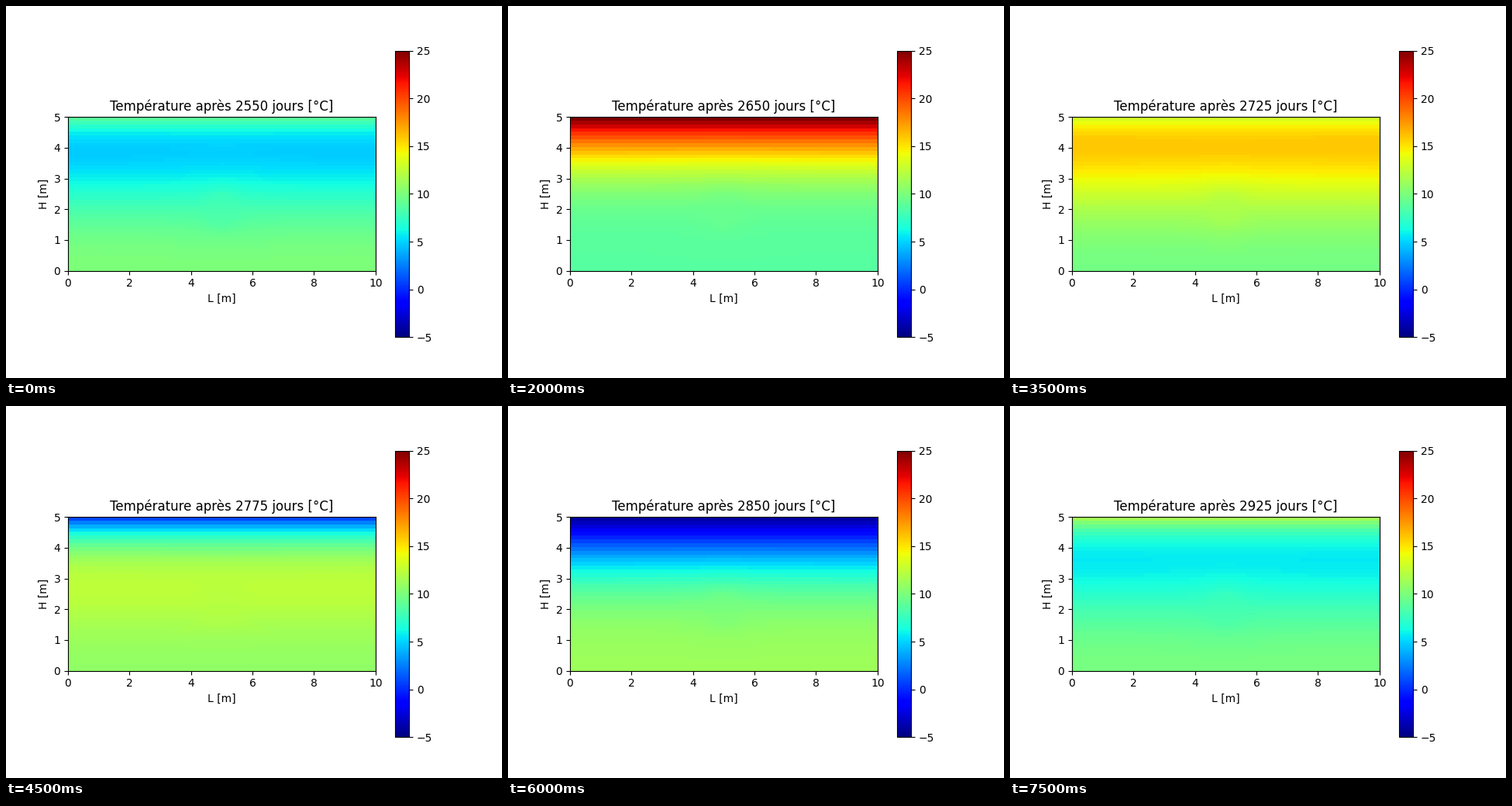
A matplotlib script that plays this animation: 640 px wide and 480 px high, repeating every 8000 ms.

```python
import numpy as np
import matplotlib.pyplot as plt
from matplotlib.animation import FuncAnimation

LENGTH, HEIGHT = 10, 5
MEAN, SWING = 10, 15          # yearly surface temperature, °C
OMEGA = 2 * np.pi / 365       # rad per day
DAMPING = 1.6                 # penetration depth, m
START, STEP, FRAMES = 2550, 25, 16
PIPE_X, PIPE_Y, PIPE_R, CONTRAST = 5, 2, 0.5, 0.55

x, y = np.meshgrid(np.linspace(0, LENGTH, 81), np.linspace(0, HEIGHT, 41))
k = (1 + 1j) / DAMPING

# Periodic heat wave in a slab with an insulated floor
wave = np.cosh(k * y) / np.cosh(k * HEIGHT)

# A conductive disc evens out the gradient inside it and disturbs it outside
slope = k * np.sinh(k * PIPE_Y) / np.cosh(k * HEIGHT)
dist2 = (x - PIPE_X) ** 2 + (y - PIPE_Y) ** 2
fade = np.sin(np.pi * y / HEIGHT)
wave = wave - (CONTRAST * slope * (y - PIPE_Y) * fade
               * PIPE_R ** 2 / np.maximum(dist2, PIPE_R ** 2))


def temperature(day):
    return MEAN + SWING * (wave * np.exp(1j * OMEGA * day)).imag


fig, ax = plt.subplots(figsize=(6.4, 4.8), dpi=100)
image = ax.imshow(temperature(START), cmap="jet", vmin=-5, vmax=25,
                  origin="lower", extent=(0, LENGTH, 0, HEIGHT),
                  interpolation="nearest")
fig.colorbar(image)
ax.set_xlabel("L [m]")
ax.set_ylabel("H [m]")
title = ax.set_title("")


def update(frame):
    day = START + STEP * frame
    image.set_data(temperature(day))
    title.set_text(f"Température après {day} jours [°C]")
    return image, title


anim = FuncAnimation(fig, update, frames=FRAMES, interval=500, repeat=True,
                     repeat_delay=0, blit=False)
plt.show()
```
